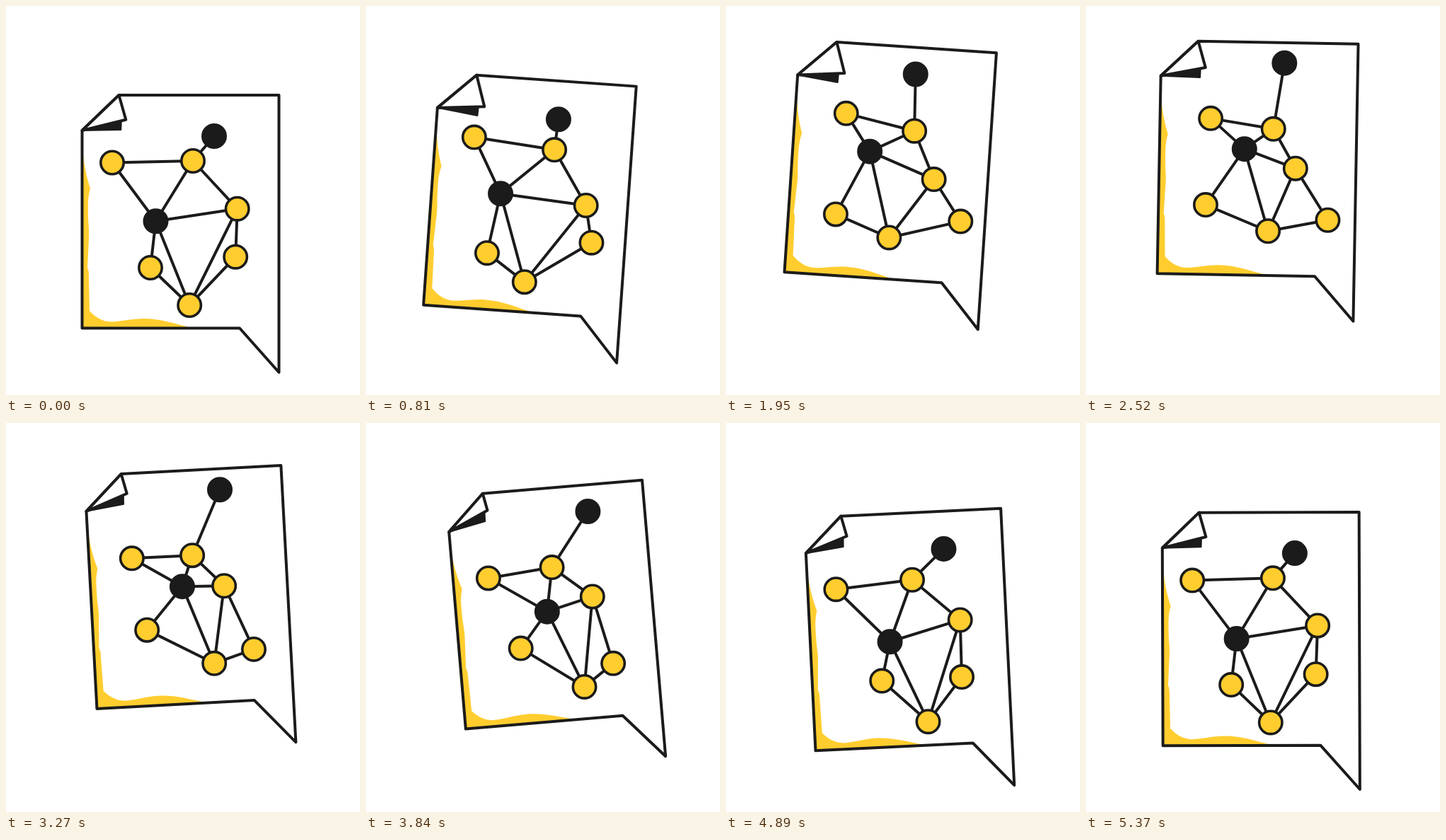
Write an HTML page with a canvas that moves like this. It is 500 px wide and 550 px high and loops after 5400 ms.

```html
<!DOCTYPE html>
<html lang="en">
<head>
<meta charset="utf-8">
<title>Floating network page</title>
<style>
  html, body { margin: 0; width: 100%; height: 100%; overflow: hidden; background: #fff; }
  canvas { display: block; }
</style>
</head>
<body>
<canvas id="stage" width="500" height="550"></canvas>
<script>
const LOOP = 5400, STEP = 30;
const INK = '#1b1b1b', YELLOW = '#ffcd2e';
const ctx = document.getElementById('stage').getContext('2d');

// Per axis: rest position, then weights of (1 - cos), sin and sin squared.
const nodes = {
  a: { x: [150, 13.65, -4.64, 1.54], y: [221.5, -28.36, -31.89, 2.35] },
  b: { x: [264, 0.13, 2.1, 0.5], y: [219, -21.84, -10.22, 2.4] },
  c: { x: [326.7, -14.34, -11.9, -0.69], y: [286.7, -29.65, 7.18, 2.65] },
  d: { x: [204, -14.2, -33.47, -0.15], y: [370, -44.59, -3.5, 0.63] },
  e: { x: [259.2, 3.73, -45.83, 0.24], y: [423, -51.45, -14.33, -0.06] },
  g: { x: [324.2, 10.02, -12.51, 0.36], y: [354.7, -24.84, -14.07, 2.5] },
  h: { x: [211.5, 9.58, -32.31, 1.14], y: [304.3, -49.17, -23.69, 0.44], dark: true },
  k: { x: [294, -4.26, -25.27, 0.18], y: [184, -51.86, -4.09, 1.46], dark: true }
};
const links = 'ab ah bh bk bc hc ce cg hd he de eg'.split(' ');

const outline = new Path2D('M159.5 126H385.5V518L330 455.5H107.5V176Z');
const splash = new Path2D(`M108 196C109 222 114 242 119 258C115 272 116 284 116 296
  C116 308 118 318 117 330C116 346 116 358 115 370C117 374 117 378 117 384L118 431
  C126 440 136 446 148 446.5C165 446 178 442 195 442C218 442 238 449 258 454V456H107.5Z`);

function orbit([rest, p, q, r], c, s) {
  return rest + p * (1 - c) + q * s + r * s * s;
}

function poly(points) {
  ctx.beginPath();
  points.forEach(([x, y]) => ctx.lineTo(x, y));
  ctx.closePath();
}

function drawPage(phase, c, s) {
  const dx = -19 * s + 0.5 * s * s;
  const dy = -(36.5 * (1 - c) + 11.5 * s - 0.8 * s * s + 0.8 * (Math.cos(3 * phase) - c));
  ctx.save();
  ctx.translate(246.5 + dx, 290.5 + dy);
  ctx.rotate(5 * s * Math.PI / 180);
  ctx.translate(-246.5, -290.5);

  ctx.fillStyle = YELLOW;
  ctx.fill(splash);
  ctx.lineWidth = 4;
  ctx.stroke(outline);

  // Folded corner: shadow, then the flap over it
  const fold = [159.5, 126], left = [107.5, 176];
  const tip = [fold[0] + 9.8 + 5.3 * s, fold[1] + 34.8 + 11 * s];
  const sx = fold[0] + 2.8 + 2.9 * s, sy = fold[1] + 49 + 10 * s;
  ctx.fillStyle = INK;
  ctx.lineWidth = 2;
  poly([left, [sx + 0.5, sy - 14], [sx, sy]]);
  ctx.fill();
  ctx.stroke();
  ctx.fillStyle = '#fff';
  ctx.lineWidth = 4;
  poly([fold, tip, left]);
  ctx.fill();
  ctx.stroke();
  ctx.restore();
}

function drawGraph(c, s) {
  const at = {};
  for (const id in nodes) at[id] = [orbit(nodes[id].x, c, s), orbit(nodes[id].y, c, s)];
  ctx.lineWidth = 4;
  for (const [from, to] of links) {
    ctx.beginPath();
    ctx.moveTo(...at[from]);
    ctx.lineTo(...at[to]);
    ctx.stroke();
  }
  ctx.lineWidth = 3.6;
  for (const id in nodes) {
    ctx.fillStyle = nodes[id].dark ? INK : YELLOW;
    ctx.beginPath();
    ctx.arc(...at[id], 16.2, 0, 2 * Math.PI);
    ctx.fill();
    ctx.stroke();
  }
}

function draw(time) {
  const phase = 2 * Math.PI * time / LOOP;
  const c = Math.cos(phase), s = Math.sin(phase);
  ctx.fillStyle = '#fff';
  ctx.fillRect(0, 0, 500, 550);
  ctx.strokeStyle = INK;
  ctx.lineJoin = ctx.lineCap = 'round';
  drawPage(phase, c, s);
  drawGraph(c, s);
}

const start = performance.now();
function tick() {
  const time = (performance.now() - start) % LOOP;
  draw(Math.floor(time / STEP) * STEP);
  requestAnimationFrame(tick);
}
tick();
</script>
</body>
</html>
```
